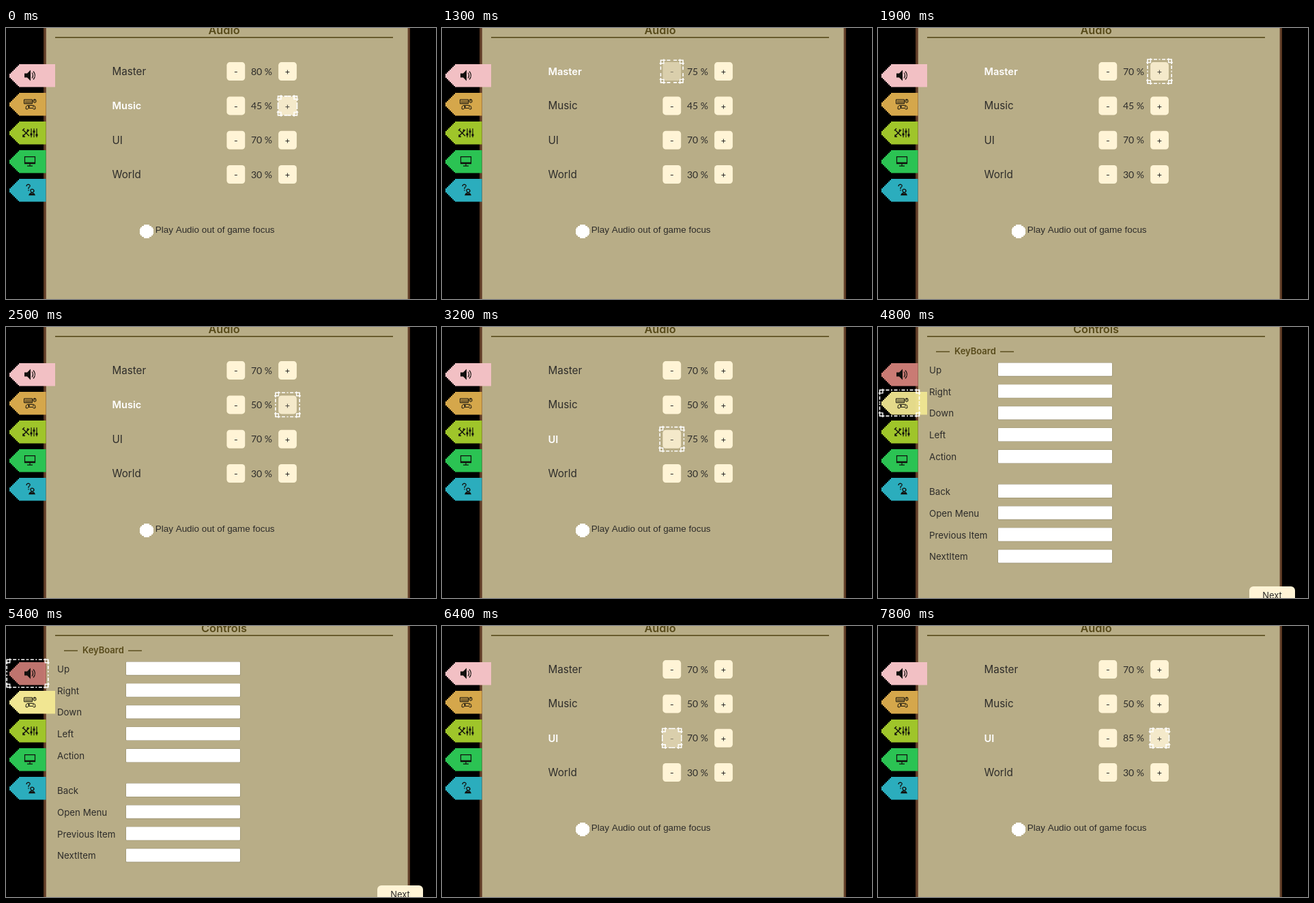
An HTML page with a canvas for the animation above (8 s loop, 630x397 px).

```html
<!DOCTYPE html>
<html lang="en">
<head>
<meta charset="utf-8">
<title>Settings menu</title>
<style>
html, body { margin: 0; width: 630px; height: 397px; overflow: hidden; background: #000; }
canvas { display: block; }
</style>
</head>
<body>
<canvas id="stage" width="630" height="397"></canvas>
<script>
const g = document.getElementById('stage').getContext('2d');
const LOOP = 8000, PULSE = 700;
const PAPER = '#b8ad87', CREAM = '#fff4d6', INK = '#2d2c2a', OLIVE = '#574a1a';
const PAGE_OPEN = 4500, PAGE_CLOSE = 5500;
const SIDE_X = { '-': 336.8, '+': 412.5 };
const ROWS = ['Master', 'Music', 'UI', 'World'];
const START = [80, 45, 70, 30];
const KEYS = ['Up', 'Right', 'Down', 'Left', 'Action', 'Back', 'Open Menu', 'Previous Item', 'NextItem'];
const TABS = ['#c97b74', '#d5a74b', '#9fc52a', '#2bc353', '#2badbd'];
const OPEN_TABS = ['#f2c0c4', '#f1e692'];

// Focus moves: time, row or tab index, side, press
const STEPS = [
  [0, 1, '+'], [700, 0, '+'], [900, 0, '-'], [1200, 0, '-', 1], [1600, 0, '-', 1],
  [1900, 0, '+'], [2100, 1, '+'], [2300, 1, '+', 1], [2700, 2, '+'], [2900, 2, '+', 1],
  [3100, 2, '-'], [3400, 1, '-'], [3600, 0, '-'], [3800, 0, 'tab'], [4300, 1, 'tab'],
  [5200, 0, 'tab'], [5800, 0, '-'], [6000, 1, '-'], [6200, 2, '-'], [6300, 2, '-', 1],
  [6600, 2, '+'], [6900, 2, '+', 1], [7100, 2, '+', 1], [7300, 2, '+', 1]
];

const rowY = i => 63.6 + 50.3 * i;
const tabY = i => 69.5 + 41.9 * i;

function rect(x, y, w, h, color) {
  g.fillStyle = color;
  g.fillRect(x, y, w, h);
}

function rounded(x, y, w, h, r, color) {
  g.fillStyle = color;
  g.beginPath();
  g.roundRect(x, y, w, h, r);
  g.fill();
}

function text(s, x, y, size, { color = INK, weight = 400, align = 'left', font = 'Inter, sans-serif' } = {}) {
  g.font = `${weight} ${size}px ${font}`;
  g.fillStyle = color;
  g.textAlign = align;
  g.fillText(s, x, y);
}

function stroke(path, width = 1) {
  g.lineWidth = width;
  g.stroke(new Path2D(path));
}

function state(t) {
  const values = [...START];
  let focus;
  for (const [at, index, side, press] of STEPS) {
    if (at > t) break;
    focus = { at, index, side, press };
    if (press) values[index] += side === '+' ? 5 : -5;
  }
  return { values, focus };
}

function drawTab(i, open, dim) {
  const y = tabY(i), right = open ? 72 : 58.5;
  g.globalAlpha = dim ? 0.95 : 1;
  const color = open ? OPEN_TABS[i] : TABS[i];
  const top = Math.round(y - 16.5);
  for (let k = 0; k < 17; k++) {
    const left = 5 + 2 * Math.max(0, Math.abs(k - 8) - 1);
    rect(left, top + 2 * k, right - left, k < 16 ? 2 : 1.5, color);
  }
  g.globalAlpha = 1;
}

const ICONS = [
  () => {
    g.fill(new Path2D('M-8-3h4l5-5v16l-5-5h-4z'));
    stroke('M3-4q3 4 0 8M5-6q5 6 0 12', 1.2);
  },
  () => {
    stroke('M-8.5-6.5h12v6h-12z');
    for (let y = -5; y <= -2; y += 1.5) for (let x = -7; x < 3; x += 2) g.fillRect(x, y, 1.2, 1);
    stroke('M7-7q2 0 2 2v2q-2 2-4 0v-2q0-2 2-2M7-7v3');
    stroke('M-3 2h8q3 0 3 5q-2 2-4-1h-6q-2 3-4 1q0-5 3-5M-3 4h3M-1.5 2.5v3M4 4h2');
  },
  () => {
    stroke('M-10-4l9 9M-10 5l9-9M-11-3l3-3M-4-2l1-3M-10 3v3h3', 1.4);
    stroke('M2-6v13M6-6v13M10-6v13', 1.2);
    for (const [x, y] of [[2, 1], [6, -3], [10, 2]]) g.fillRect(x - 1.5, y, 3, 3);
  },
  () => {
    stroke('M-7.5-6.5h15v10h-15zM0 4v3M-4 7h8', 1.2);
    g.fillRect(-7, 1.5, 14, 2);
  },
  () => {
    stroke('M-5-5q0-3 3-3q3 1 2 3l-2 2v2M-2 0v1.5', 1.2);
    stroke('M3-1q3 0 3 3q-1 2-3 2q-2-1-2-3q0-2 2-2M-1 7.5q1-3 4-3q3 0 4 3z', 1.4);
    g.fillRect(0, 5.5, 6, 2);
  }
];

function drawIcon(i) {
  g.save();
  g.translate(35, tabY(i));
  g.fillStyle = g.strokeStyle = '#11100d';
  ICONS[i]();
  g.restore();
}

function drawFrame(title) {
  rect(0, 0, 630, 397, '#000');
  rect(55, 0, 537, 397, '#5b3923');
  rect(57.5, 0, 532, 397, '#75513a');
  rect(59, 0, 529.5, 397, PAPER);
  text(title, 319.5, 9.3, 16.3, { color: OLIVE, weight: 600, align: 'center' });
  rect(72, 13, 495, 1.6, OLIVE);
}

function drawAudio({ values, focus }, t) {
  ROWS.forEach((name, i) => {
    const y = rowY(i), active = focus.side !== 'tab' && focus.index === i;
    text(name, 155.5, y + 5.4, active ? 14.6 : 15.2, { weight: active ? 600 : 400, color: active ? '#fff' : INK });
    for (const [side, x] of Object.entries(SIDE_X)) {
      if (active && focus.side === side) g.globalAlpha = focus.press && t - focus.at < 200 ? 0.48 : 0.84;
      rounded(x - 13.4, y - 13.5, 26.8, 27, 4.5, CREAM);
      text(side, x, y + 4.6, 12.5, { align: 'center' });
      g.globalAlpha = 1;
    }
    text(values[i] + ' %', 374.5, y + 5, 14, { align: 'center', font: 'Lato, sans-serif' });
  });
  for (let k = -5; k < 5; k++) {
    const half = Math.round(Math.sqrt(100 - (2 * k + 1) ** 2));
    rect(206 - half, 298 + 2 * k, 2 * half, 2, '#fff');
  }
  text('Play Audio out of game focus', 218.8, 300, 13.45, { font: '"Liberation Sans", Arial, sans-serif' });
}

function drawControls() {
  text('KeyBoard', 112, 39.5, 13, { color: OLIVE, weight: 600 });
  rect(85, 35.5, 20, 1.4, OLIVE);
  rect(179, 35.5, 20, 1.4, OLIVE);
  KEYS.forEach((name, i) => {
    const y = 62 + 31.9 * i + (i > 4 ? 18.6 : 0);
    text(name, 75, y + 5.6, 13.3);
    rounded(175.5, y - 10, 168, 20.4, 1.5, '#8f8768');
    rounded(176, y - 9.6, 167, 19.4, 1, '#fff');
  });
  rounded(544, 380, 67, 30, 6, CREAM);
  text('Next', 577.5, 398, 13, { align: 'center' });
}

function drawFocus({ index, side }, t) {
  const grow = t < 600 ? 0 : 1.9 * (1 - Math.cos(2 * Math.PI * (t - 100) / PULSE));
  const tab = side === 'tab';
  const w = (tab ? 28.5 : 15.8) + grow, h = (tab ? 18.5 : 15.8) + grow;
  g.save();
  g.translate(tab ? 31.5 : SIDE_X[side], tab ? tabY(index) : rowY(index));
  g.strokeStyle = '#fff';
  g.lineWidth = 1.6;
  const a = w - 1.8, b = h - 1.8;
  for (const sx of [-1, 1]) for (const sy of [-1, 1]) {
    g.save();
    g.scale(sx, sy);
    stroke(`M${a - 7} ${b}H${a}V${b - 7}`, 1.6);
    stroke(`M${a - 4.5} ${h}V${b - 4.5}H${w}`, 1.4);
    // Dashes run from each corner to the middle of its sides
    g.setLineDash([5, 2.5, 2, 2.5]);
    stroke(`M${a - 9} ${b}H0M${a} ${b - 9}V0`, 1.6);
    g.restore();
  }
  g.restore();
}

function draw(now) {
  const t = Math.floor(now % LOOP / 100) * 100;
  const s = state(t);
  const page = t >= PAGE_OPEN && t < PAGE_CLOSE ? 1 : 0;
  drawFrame(page ? 'Controls' : 'Audio');
  if (page) drawControls();
  else drawAudio(s, t);
  TABS.forEach((_, i) => {
    drawTab(i, i === page, s.focus.side === 'tab' && s.focus.index === i);
    drawIcon(i);
  });
  drawFocus(s.focus, t);
}

const begin = performance.now();
function tick() {
  draw(performance.now() - begin);
  requestAnimationFrame(tick);
}
tick();
</script>
</body>
</html>
```
